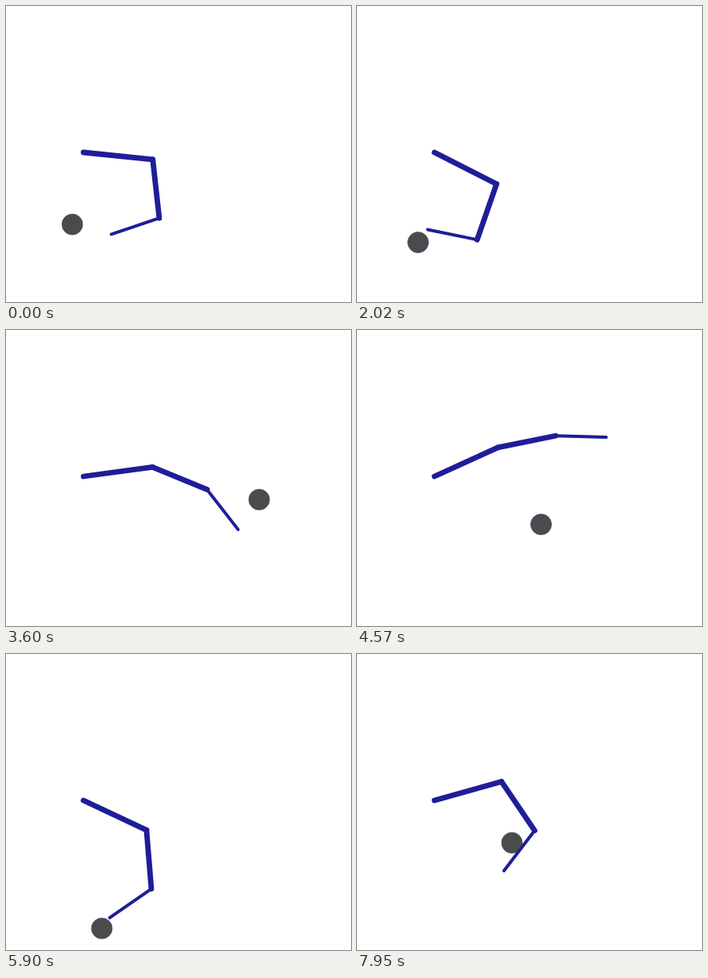
These frames come from a looping animation (432 by 370 pixels, 8 s). An HTML page:

```html
<!DOCTYPE html>
<html lang="en">
<head>
<meta charset="utf-8">
<title>Reaching arm</title>
<style>
  html, body { margin: 0; width: 100%; height: 100%; overflow: hidden; background: #fff; }
  svg { display: block; width: 100vw; height: 100vh; }
  line { stroke: #1e1e99; stroke-linecap: round; }
</style>
</head>
<body>
<svg viewBox="0 0 432 370">
  <circle id="ball" r="13" fill="#4b4b4b" stroke="#4a4a78" stroke-width=".8"/>
  <g id="arm">
    <line stroke-width="4"/>
    <line stroke-width="6.8"/>
    <line stroke-width="6.8"/>
  </g>
</svg>
<script>
const LOOP = 8000, LAST = 7950;
const BASE = { x: 97, y: 183 };
const [A, B, C] = [87.2, 73.8, 63.3];   // link lengths
const GAP = 14;                         // tip to ball centre at a touch

const point = ([t, x, y]) => ({ t, x, y });

// where the ball lands, and when
const balls = [
  [0, 83, 273], [300, 291.5, 180], [1050, 76.5, 295.5], [2080, 317, 173.5],
  [2780, 228, 321.5], [3390, 317, 212], [3780, 305, 102.5], [4400, 230.5, 243],
  [4870, 200, 288.5], [5280, 120, 343], [5940, 204, 256], [6610, 117, 349.5],
  [7420, 194, 236]
].map(point);

// where the tip passes between touches
const passes = [
  [0, 132, 285.3], [1230, 260.5, 218], [2020, 88.5, 279.5], [3600, 290.5, 249.5],
  [4570, 312, 134], [5900, 130, 329.5], [LAST, 184, 271]
].map(point);

// each ball is touched on the side facing the one before, then the next appears
const touches = balls.slice(0, -1).map((ball, i) => {
  const from = balls[i - 1] || passes[0];
  const dx = from.x - ball.x, dy = from.y - ball.y;
  const k = GAP / Math.hypot(dx, dy);
  return { t: balls[i + 1].t, x: ball.x + dx * k, y: ball.y + dy * k };
});

// inverse kinematics: both elbows share one bend, so its cosine solves a quadratic
function solve({ t, x, y }) {
  const dx = x - BASE.x, dy = y - BASE.y;
  const p = 4 * A * C, q = 2 * B * (A + C);
  const r = A * A + B * B + C * C - 2 * A * C - dx * dx - dy * dy;
  const cos = (Math.sqrt(q * q - 4 * p * r) - q) / (2 * p);
  const bend = Math.acos(Math.min(1, cos));
  const lean = Math.atan2(
    B * Math.sin(bend) + C * Math.sin(2 * bend),
    A + B * Math.cos(bend) + C * Math.cos(2 * bend)
  );
  return { t, bend, turn: Math.atan2(dy, dx) - lean };
}

const poses = [...passes, ...touches].sort((a, b) => a.t - b.t).map(solve);

const rate = (p, q, key) => (q[key] - p[key]) / (q.t - p.t);

// zero at turning points, harmonic mean of the neighbouring rates elsewhere
function slope(i, key) {
  const p = poses[i - 1], q = poses[i], r = poses[i + 1];
  if (!p) return rate(q, r, key);
  if (!r) return rate(p, q, key);
  const m = rate(p, q, key), n = rate(q, r, key);
  return m * n > 0 ? 2 * m * n / (m + n) : 0;
}

// cubic Hermite through the poses
function sample(t, key) {
  const i = Math.max(0, poses.findIndex(p => p.t >= t) - 1);
  const p = poses[i], q = poses[i + 1], d = q.t - p.t;
  const u = (t - p.t) / d, v = 1 - u;
  return v * v * (1 + 2 * u) * p[key] + u * u * (1 + 2 * v) * q[key]
    + u * v * d * (v * slope(i, key) - u * slope(i + 1, key));
}

const ballEl = document.getElementById('ball');
const links = [...document.querySelectorAll('#arm line')].reverse();

const set = (el, attrs) => {
  for (const key in attrs) el.setAttribute(key, attrs[key]);
};

function draw(time) {
  const t = Math.min(time % LOOP, LAST);
  const ball = balls.filter(b => b.t <= t).pop();
  set(ballEl, { cx: ball.x, cy: ball.y });

  const bend = sample(t, 'bend');
  let angle = sample(t, 'turn');
  let { x, y } = BASE;
  [A, B, C].forEach((length, i) => {
    const x2 = x + length * Math.cos(angle);
    const y2 = y + length * Math.sin(angle);
    set(links[i], { x1: x, y1: y, x2, y2 });
    [x, y] = [x2, y2];
    angle += bend;
  });
}

const start = performance.now();
function tick() {
  draw(Math.max(0, performance.now() - start));
  requestAnimationFrame(tick);
}
tick();
</script>
</body>
</html>
```
